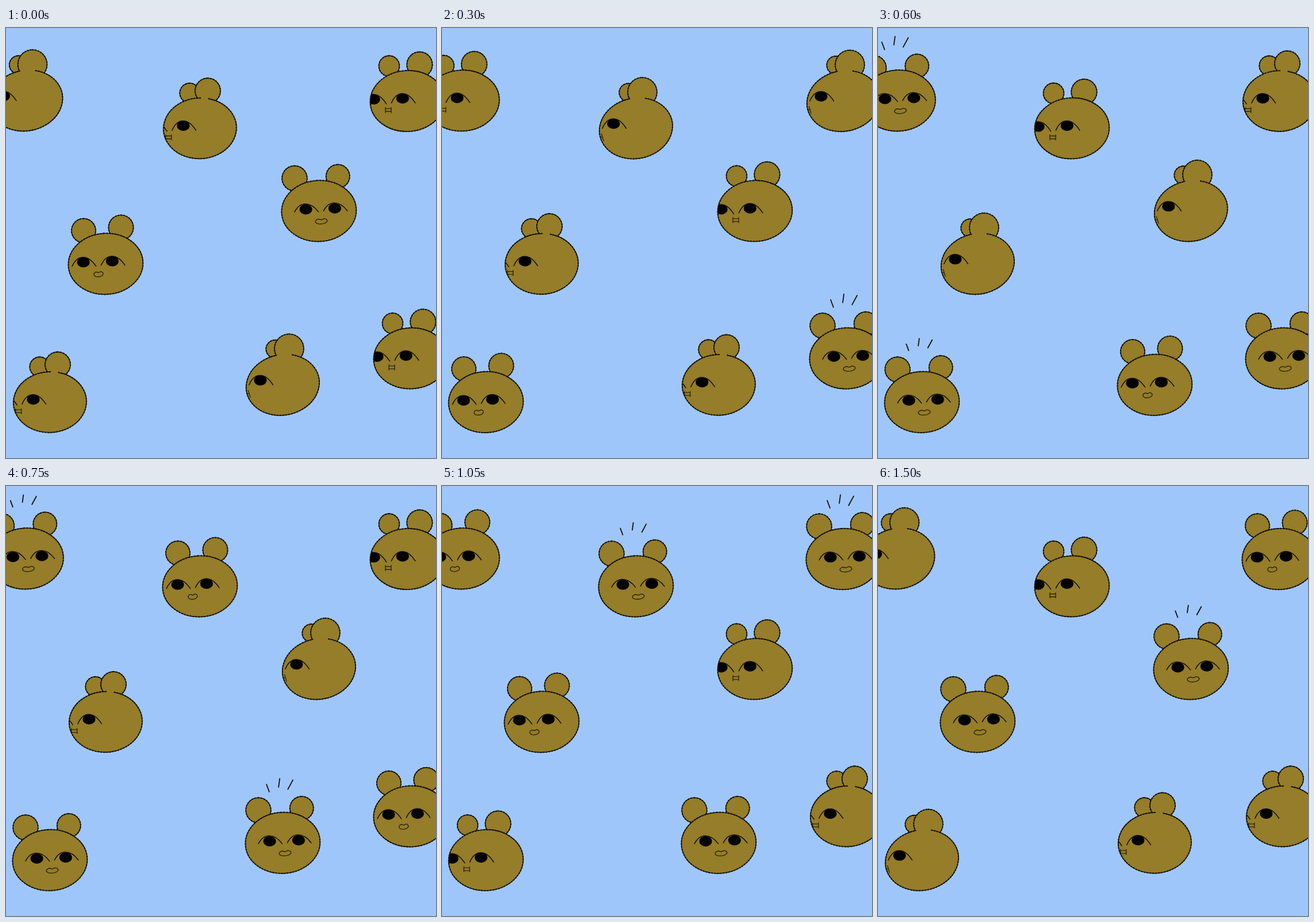
An HTML page with a canvas for the animation above (1650 ms loop, 748 by 748 pixels).

```html
<!DOCTYPE html>
<html lang="en">
<head>
<meta charset="utf-8">
<title>Turning bears</title>
<style>
html, body { margin: 0; width: 100%; height: 100%; overflow: hidden; background: #9fc6fb; }
canvas { display: block; width: 748px; height: 748px; }
</style>
</head>
<body>
<canvas id="stage" width="748" height="748"></canvas>
<script>
const ctx = document.getElementById('stage').getContext('2d');
const SKY = '#9fc6fb', FUR = '#957d29', INK = '#120f05', LIP = '#2e250a';
const STEP = 150, PHASES = 11;

// Head centre and lead in the cycle for each bear.
const BEARS = [
  { x: 34.9, y: 126.3, lead: 0 }, { x: 337.4, y: 174.5, lead: 9 },
  { x: 698.4, y: 127, lead: 8 }, { x: 544.4, y: 318.3, lead: 6 },
  { x: 173.4, y: 410.3, lead: 7 }, { x: 76.4, y: 650.8, lead: 1 },
  { x: 481.4, y: 620.8, lead: 10 }, { x: 704.4, y: 574.6, lead: 2 }
];

// From profile to front. turn: how far the face slides left; ears: x, y, radius;
// gap: where the outline opens in front of the ears, as an angle from the top.
const POSES = [
  { turn: 66.5, rx: 64, ry: 52.6, tilt: -0.2, gap: [0, 0.43], ears: [[-13.4, -62.3, 15.7], [11.1, -63, 25.4]], mouth: slash },
  { turn: 56.5, rx: 63.5, ry: 52.8, tilt: -0.05, gap: [0.06, 0.28], ears: [[-17.9, -61.3, 17.2], [13.6, -65.3, 22]], mouth: box },
  { turn: 36, rx: 64.9, ry: 53, tilt: -0.06, gap: [0, 0], ears: [[-31.9, -60.8, 17.9], [21.1, -63.3, 22.2]], mouth: box },
  { turn: 16, rx: 65, ry: 53.1, tilt: -0.06, gap: [0, 0], ears: [[-38.4, -57.8, 21], [26.6, -63.3, 21.6]], mouth: bean },
  { turn: 0, rx: 65, ry: 53.1, tilt: -0.06, gap: [0, 0], ears: [[-42.4, -56.8, 21.8], [32.9, -60.3, 20.5]], mouth: bean }
];

function ink(path, width, color = INK) {
  ctx.strokeStyle = color;
  ctx.lineWidth = width;
  ctx.stroke(path);
}

// Pencil line: a thin stroke with small grains along it.
function pencil(path) {
  ink(path, 1.4);
  ctx.setLineDash([1, 4]);
  ink(path, 2.1);
  ctx.setLineDash([]);
}

function oval(x, y, rx, ry, tilt = 0, [from, to] = [0, 0]) {
  const top = -Math.PI / 2, path = new Path2D();
  path.ellipse(x, y, rx, ry, tilt, top + to, top + from + Math.PI * 2);
  return path;
}

function line(path, x1, y1, x2, y2) {
  path.moveTo(x1, y1);
  path.lineTo(x2, y2);
}

function eye(x, y, drop) {
  const lid = new Path2D();
  lid.moveTo(x - 19.5, y + drop);
  lid.bezierCurveTo(x - 10, y - 14, x + 8, y - 14, x + 22, y + drop);
  const below = new Path2D(lid);
  below.lineTo(x + 22, y + 20);
  below.lineTo(x - 20, y + 20);
  ctx.save();
  ctx.clip(below);
  ctx.fillStyle = '#030200';
  ctx.fill(oval(x, y, 11, 9));
  ctx.restore();
  ink(lid, 1.5);
}

// Closed lips with a dent in the upper edge.
function bean(turn) {
  const w = 10.3 - turn * 0.14, path = new Path2D();
  for (let a = 0; a < Math.PI * 2; a += 0.2) {
    const x = w * Math.cos(a), up = Math.sin(a) < 0;
    const dent = up ? 2.5 * Math.exp(-9 * Math.cos(a) ** 2) : 0;
    path.lineTo(x, 4.8 * Math.sin(a) + dent - x * 0.08);
  }
  path.closePath();
  return path;
}

function box() {
  const path = new Path2D();
  for (const s of [-1, 1]) {
    line(path, s * 5, -4.5, s * 5, 4.5);
    line(path, -5, s * 2.5, 5, s * 2.5);
  }
  return path;
}

function slash() {
  const path = new Path2D();
  line(path, -1.5, -6, 2, 6);
  line(path, -4, 0, 0, -0.5);
  return path;
}

// Three strokes fanning out above the head; the second drawing is shorter.
function spark(second) {
  const path = new Path2D(), size = second ? 0.87 : 1;
  for (let i = -1; i <= 1; i++) {
    const x = -6.3 + i * 19.6 + second * 0.8, y = -104.3 + (i ? 6 : 0) - i * 3;
    const dx = (i * 3.4 + 1) * size, dy = (7.3 + i * 0.8) * size;
    line(path, x + dx, y - dy, x - dx, y + dy);
  }
  return path;
}

function face({ turn, mouth }) {
  const y = turn > 60 ? -8 : -4.6, drop = Math.min(8, 4.5 + turn * 0.15);
  eye(27.5 - turn, y, drop);
  eye(-22.8 - turn, y + 1.7, drop);
  ctx.translate(Math.max(-58.4, 4.1 - turn * 1.04), turn > 20 ? 15.8 : 17.7);
  ink(mouth(turn), 1.4, LIP);
}

function bear(x, y, phase) {
  const pose = POSES[Math.min(phase, PHASES - 1 - phase, 4)];
  const head = [0, 0, pose.rx, pose.ry, pose.tilt], skull = oval(...head);
  ctx.save();
  ctx.translate(x, y);
  ctx.fillStyle = FUR;
  for (const [ex, ey, r] of pose.ears) {
    const ear = oval(ex, ey, r, r);
    ctx.fill(ear);
    pencil(ear);
  }
  ctx.fill(skull);
  ctx.save();
  ctx.clip(skull);
  face(pose);
  ctx.restore();
  pencil(oval(...head, pose.gap));
  if (phase === 4 || phase === 5) ink(spark(phase === 5), 1.8);
  ctx.restore();
}

function draw(time) {
  const step = Math.floor(time / STEP);
  ctx.fillStyle = SKY;
  ctx.fillRect(0, 0, 748, 748);
  for (const { x, y, lead } of BEARS) bear(x, y, (step + lead) % PHASES);
}

ctx.lineCap = ctx.lineJoin = 'round';
const start = performance.now();
function tick() {
  draw(performance.now() - start);
  requestAnimationFrame(tick);
}
tick();
</script>
</body>
</html>
```
